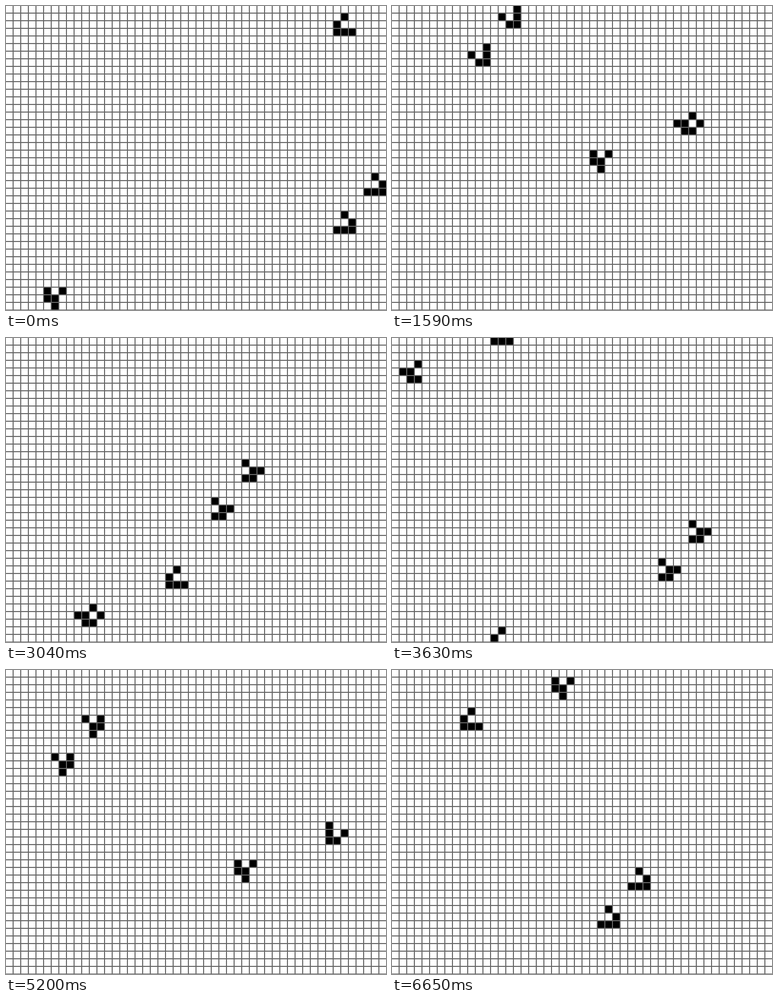
Animation of 748 by 599 pixels, one loop 6.68 s. Source, as an HTML page with a canvas:

```html
<!DOCTYPE html>
<html lang="en">
<head>
<meta charset="utf-8">
<title>Gliders</title>
<style>
html, body { margin: 0; width: 100%; height: 100%; overflow: hidden; background: #fff; }
canvas { display: block; }
</style>
</head>
<body>
<canvas id="stage" width="748" height="599"></canvas>
<script>
const ctx = document.getElementById('stage').getContext('2d');
const LOOP = 6680, GENERATIONS = 338, REFRESH = 30;
const COLS = 50, ROWS = 40, PITCH = 15, CELL = 13;
const SWEEP = 0.3; // last part of a generation, in which the next one is written

// Key points of the pace: [time in ms, generation]
const PACE = [
  [0, 0.3], [1590, 69.91], [3040, 134.99], [3630, 167.3],
  [4540, 214.3], [5880, 293.3], [6650, 336.3], [LOOP, 337]
];

const cellIndex = (col, row) =>
  (row + ROWS) % ROWS * COLS + (col + COLS) % COLS;

function stamp(live, x, y, ...rows) {
  rows.forEach((line, dy) => [...line].forEach((mark, dx) => {
    if (mark === 'x') live.add(cellIndex(x + dx, y + dy));
  }));
}

// One step of Conway's Game of Life on a torus.
function evolve(live) {
  const neighbours = new Map();
  for (const cell of live) {
    const col = cell % COLS, row = Math.floor(cell / COLS);
    for (let dy = -1; dy <= 1; dy++) {
      for (let dx = -1; dx <= 1; dx++) {
        if (!dx && !dy) continue;
        const near = cellIndex(col + dx, row + dy);
        neighbours.set(near, (neighbours.get(near) || 0) + 1);
      }
    }
  }
  const next = new Set();
  for (const [cell, count] of neighbours) {
    if (count === 3 || (count === 2 && live.has(cell))) next.add(cell);
  }
  return next;
}

const seed = new Set();
stamp(seed, 47, 22, '.x.', '..x', 'xxx');
stamp(seed, 43, 27, '.x.', '..x', 'xxx');
stamp(seed, 43, 1, '.x.', 'x..', 'xxx');
stamp(seed, 5, 37, 'x.x', 'xx.', '.x.');

const history = [seed];
while (history.length <= GENERATIONS) history.push(evolve(history[history.length - 1]));

function generationAt(t) {
  const i = PACE.findIndex(key => key[0] > t);
  const [t0, g0] = PACE[i - 1], [t1, g1] = PACE[i];
  const shown = Math.floor((t - t0) / REFRESH) * REFRESH;
  return g0 + (g1 - g0) * shown / (t1 - t0);
}

// Live cells at a fractional generation: changes are applied in reading order.
function cellsAt(g) {
  const gen = Math.floor(g), now = history[gen], next = history[gen + 1];
  const changes = [...now].filter(cell => !next.has(cell))
    .concat([...next].filter(cell => !now.has(cell)))
    .sort((a, b) => a - b);
  const progress = Math.max(0, (g - gen - 1 + SWEEP) / SWEEP);
  const cells = new Set(now);
  for (const cell of changes.slice(0, Math.floor(progress * changes.length))) {
    if (!cells.delete(cell)) cells.add(cell);
  }
  return cells;
}

function draw(t) {
  ctx.fillStyle = '#fff';
  ctx.fillRect(0, 0, 748, 599);
  ctx.fillStyle = '#666';
  for (let p = CELL; p < 748; p += PITCH) {
    ctx.fillRect(p, 0, 2, 599);
    ctx.fillRect(0, p, 748, 2);
  }
  ctx.fillStyle = '#000';
  for (const cell of cellsAt(generationAt(t))) {
    ctx.fillRect(cell % COLS * PITCH, Math.floor(cell / COLS) * PITCH, CELL, CELL);
  }
}

const start = performance.now();
function tick() {
  draw((performance.now() - start) % LOOP);
  requestAnimationFrame(tick);
}
tick();
</script>
</body>
</html>
```
